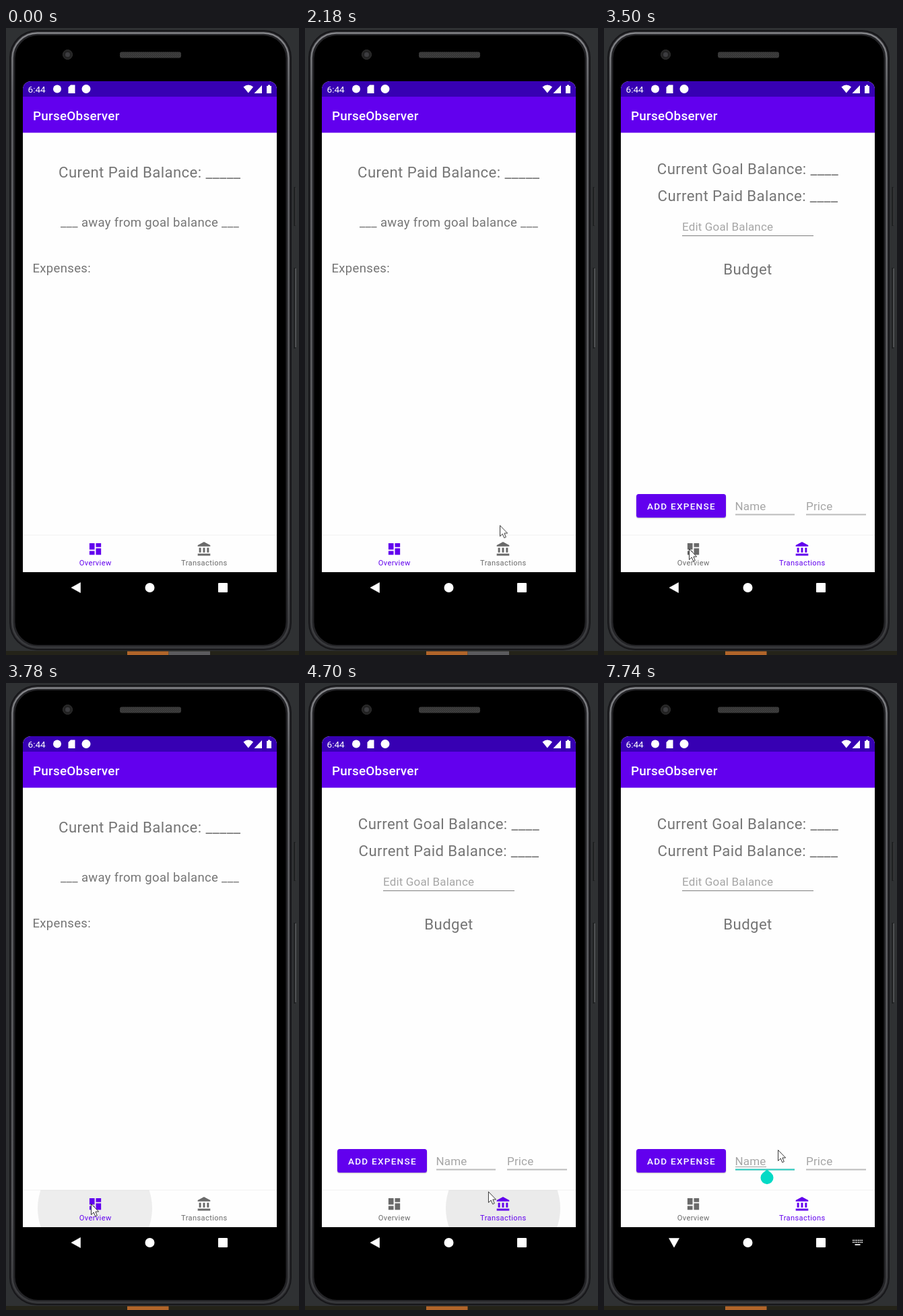
An HTML page that plays this animation: 435 px wide and 931 px high, repeating every 8000 ms.

```html
<!DOCTYPE html>
<html lang="en">
<head>
<meta charset="utf-8">
<title>Budget app demo</title>
<style>
html, body { margin: 0; width: 100%; height: 100%; overflow: hidden; background: #2f3133; }
svg { display: block; width: 435px; height: 931px; font-family: Roboto, sans-serif; }
.page text { fill: #757575; letter-spacing: .0179em; }
.big { font-size: 22.2px; }
.mid { font-size: 18.5px; }
.page .hint { font-size: 17px; letter-spacing: .0094em; fill: #a6a6a6; }
.mid-x { text-anchor: middle; }
.tab { fill: currentColor; color: #6a6a6a; font-size: 11.1px; letter-spacing: .0333em; }
.page .button { font-size: 13.6px; font-weight: 500; letter-spacing: .0893em; fill: #fff; }
#back { transform-origin: 104px 831px; }
</style>
</head>
<body>
<svg viewBox="0 0 435 931">
  <defs>
    <linearGradient id="metal" x2="0" y2="1">
      <stop stop-color="#85868a"/><stop offset=".1" stop-color="#626367"/>
      <stop offset=".85" stop-color="#56575a"/><stop offset="1" stop-color="#38393c"/>
    </linearGradient>
    <pattern id="mesh" width="3" height="3" patternUnits="userSpaceOnUse">
      <rect width="3" height="3" fill="#303030"/><path d="M0 0l3 3M3 0L0 3" stroke="#4c4c4c" stroke-width=".6"/>
    </pattern>
    <clipPath id="screen"><path d="M25 808V91a12 12 0 0 1 12-12H390a12 12 0 0 1 12 12V808z"/></clipPath>
    <clipPath id="bar"><path d="M25 753.500H402V808H25z"/></clipPath>
  </defs>

  <path d="M0 0H435V931H0z" fill="#2f3133"/>
  <path d="M0 925H435V931H0z" fill="#242319"/>
  <path d="M180 925.500h61.500v5.500h-61.500z" fill="#b1652a"/>
  <path id="task" d="M241.500 925.500h61.500v5.500h-61.500z" fill="#5b5b5e"/>

  <path d="M428.500 236v58M428.500 356v120" stroke="#1b1c1d" stroke-width="2"/>
  <path d="M430 357v117" stroke="#77787a"/>
  <path d="M430 237v56" stroke="#3c3d3f"/>
  <rect x="5" y="3" width="419" height="921" rx="41" fill="#17171a"/>
  <rect x="7" y="5" width="415" height="917" rx="39" fill="#2b2b2e"/>
  <rect x="9.500" y="7.500" width="410" height="912" rx="37" fill="#232326" stroke="url(#metal)" stroke-width="2.500"/>
  <rect x="13.500" y="11" width="402" height="905" rx="34" fill="#000"/>
  <circle cx="91.500" cy="39.500" r="7" fill="#222" stroke="#343434"/>
  <circle cx="91.500" cy="39.500" r="3.500" fill="#3d3d40"/>
  <rect x="169" y="35.500" width="91" height="9" rx="3" fill="url(#mesh)"/>

  <g clip-path="url(#screen)">
    <path d="M25 79H402V808H25z" fill="#fefefe"/>
    <path d="M25 79H402V102.500H25z" fill="#3700b3"/>
    <path d="M25 102H402V155.500H25z" fill="#6200ee"/>
    <g fill="#fff">
      <text x="32.500" y="95.700" font-size="13.600">6:44</text>
      <circle cx="76" cy="90.500" r="6"/>
      <path d="M96 84.500h6.500v12.500h-10v-9z"/>
      <circle cx="119" cy="90.500" r="6.500"/>
      <path d="M352.500 87.500q7.300-6 14.600 0l-7.300 9z"/>
      <path d="M368.500 97h11.500V85z"/>
      <path d="M387 86h2v-1.500h3V86h2v11h-7z"/>
      <text x="40" y="136.500" font-size="18.900" font-weight="500" letter-spacing=".23">PurseObserver</text>
    </g>

    <g id="overview" class="page">
      <text class="big mid-x" x="213.300" y="222">Curent Paid Balance: _____</text>
      <text class="mid mid-x" x="213.500" y="295">___ away from goal balance ___</text>
      <text class="mid" x="39.500" y="363">Expenses:</text>
    </g>

    <g id="transactions" class="page" opacity="0">
      <text class="big mid-x" x="213.500" y="216.700">Current Goal Balance: ____</text>
      <text class="big mid-x" x="213.500" y="257">Current Paid Balance: ____</text>
      <text class="hint" x="116" y="301">Edit Goal Balance</text>
      <path d="M116 308.500H311" stroke="#7d7d7d"/>
      <text class="big mid-x" x="213.500" y="366">Budget</text>
      <rect x="47.500" y="693.500" width="134" height="35" rx="4" opacity=".16"/>
      <rect x="48" y="692" width="133" height="35" rx="3.500" fill="#6200ee"/>
      <text class="button" x="64" y="714.700">ADD EXPENSE</text>
      <text class="hint" x="194.500" y="716">Name</text>
      <text class="hint" x="300" y="716">Price</text>
      <path d="M195 722.500h88M300 722.500h89" stroke="#bbb" stroke-width="1.800"/>
      <path id="focus" d="M195 722.500h88" stroke="#2bd0c4" stroke-width="2" opacity="0"/>
      <path id="compose" d="M195 718.500h46" stroke="#a0a0a0" opacity="0"/>
      <path id="caret" d="M242 697v24" stroke="#03dac5" stroke-width="2" opacity="0"/>
      <path id="handle" d="M242 722.500l6.500 5.200a9.500 9.500 0 1 1-13 0z" fill="#03dac5" opacity="0"/>
    </g>

    <path d="M25 753H402" stroke="#f7f7f7" stroke-width="2"/>
    <g clip-path="url(#bar)">
      <path d="M25 754H402V808H25z" fill="#fefefe"/>
      <circle id="rippleLeft" r="85" opacity="0"/>
      <circle id="rippleRight" r="85" opacity="0"/>
    </g>
    <g id="tabLeft" class="tab">
      <path transform="translate(121 762) scale(.96)" d="M3 13h8V3H3zM3 21h8v-6H3zM13 21h8V11h-8zM13 3v6h8V3z"/>
      <text class="mid-x" x="132.700" y="798">Overview</text>
    </g>
    <g id="tabRight" class="tab">
      <path transform="translate(282.700 762) scale(.98)" d="M4 10v7h3v-7zM10 10v7h3v-7zM2 22h19v-3H2zM16 10v7h3v-7zM11.500 1L2 6v2h19V6z"/>
      <text class="mid-x" x="294.300" y="798">Transactions</text>
    </g>
  </g>

  <g fill="#fff">
    <path id="back" d="M97 831l13.500-7.500v15z" stroke="#fff" stroke-width=".6" stroke-linejoin="round"/>
    <circle cx="213.500" cy="831" r="7"/>
    <rect x="315" y="824" width="14" height="14" rx="1"/>
    <g id="keyboard" stroke="#fff" stroke-width="1.700" opacity="0">
      <path d="M369 827.500h15M369 830.500h15" stroke-dasharray="1.800 .84"/>
      <path d="M372.500 834h8"/>
    </g>
  </g>

  <path id="cursor" d="M.5.5V16.500L4.200 13l2.500 5.800 2.600-1.100L6.900 12h4.700z" fill="#fff" stroke="#222" stroke-width=".9" stroke-linejoin="round" opacity="0"/>
</svg>

<script>
const LOOP = 8000;
const byId = id => document.getElementById(id);

// steps: [time, value]; the last value is held to the end of the loop
function play(id, prop, steps, easing = 'linear') {
  const frames = steps.map(([time, value]) => ({ offset: time / LOOP, [prop]: value, easing }));
  frames.push({ offset: 1, [prop]: steps.at(-1)[1] });
  byId(id).animate(frames, { duration: LOOP, iterations: Infinity });
}
const hold = (id, prop, steps) => play(id, prop, steps, 'steps(1, end)');
const move = (x, y, scale = 1) => `translate(${x}px, ${y}px) scale(${scale})`;

function ripple(id, taps, centre) {
  const grow = [[0, move(centre, 780, 0)]];
  const fade = [[0, 0]];
  for (const { press, release, x, y } of taps) {
    const midX = x + (centre - x) * .1;
    grow.push([press - 1, move(x, y, 0)], [press, move(x, y, .1)], [press + 80, move(midX, y, .58)],
      [press + 230, move(centre, 780, 1)], [release + 320, move(centre, 780, 1)]);
    fade.push([press, 0], [press + 80, .042], [press + 200, .075], [release, .075], [release + 300, 0]);
  }
  play(id, 'transform', grow);
  play(id, 'opacity', fade);
}

const path = [
  [0, 344, 777], [250, 344, 777], [320, 330, 735], [460, 278, 600], [600, 240, 509],
  [930, 240, 509], [1080, 170, 446], [1220, 106, 500], [1370, 150, 595], [1540, 270, 655],
  [1700, 267, 638], [1770, 267, 637], [2040, 267, 637], [2180, 289, 738], [2320, 294, 766],
  [2950, 294, 766], [3090, 205, 768], [3230, 127, 773], [3430, 126, 773], [3850, 126, 773],
  [4030, 215, 776], [4210, 308, 778], [4490, 308, 778], [4700, 272, 755], [4900, 258, 733],
  [5080, 256, 726], [5320, 255, 704], [6200, 255, 704], [6500, 258, 693]
];
play('cursor', 'transform', path.map(([time, x, y]) => [time, move(x, y)]));
hold('cursor', 'opacity', [[0, 0], [250, 1]]);
hold('task', 'opacity', [[0, 1], [2600, 0]]);

const crossfade = (from, to) => [
  [0, from], [2880, from], [2950, to], [3640, to], [3710, from], [4490, from], [4560, to]
];
play('overview', 'opacity', crossfade(1, 0));
play('transactions', 'opacity', crossfade(0, 1));

const ON = '#6200ee', OFF = '#6a6a6a';
const select = (from, to) => [[0, from], [2880, to], [3640, from], [4490, to]];
hold('tabLeft', 'color', select(ON, OFF));
hold('tabRight', 'color', select(OFF, ON));

ripple('rippleRight', [
  { press: 2570, release: 2880, x: 296, y: 770 },
  { press: 4270, release: 4740, x: 309, y: 782 }
], 294);
ripple('rippleLeft', [{ press: 3510, release: 3750, x: 127, y: 775 }], 132);

play('focus', 'opacity', [[0, 0], [5250, 0], [5390, 1]]);
play('handle', 'opacity', [[0, 0], [5990, 0], [6070, .65], [6200, 1]]);
hold('caret', 'opacity', [[0, 0], [6240, 1], [6740, 0], [7250, 1], [7740, 0]]);
hold('keyboard', 'opacity', [[0, 0], [6470, 1]]);
hold('compose', 'opacity', [[0, 0], [6810, 1]]);
play('back', 'transform', [[0, 'rotate(0deg)'], [6780, 'rotate(0deg)'], [7150, 'rotate(-90deg)']], 'ease-in-out');
</script>
</body>
</html>
```
